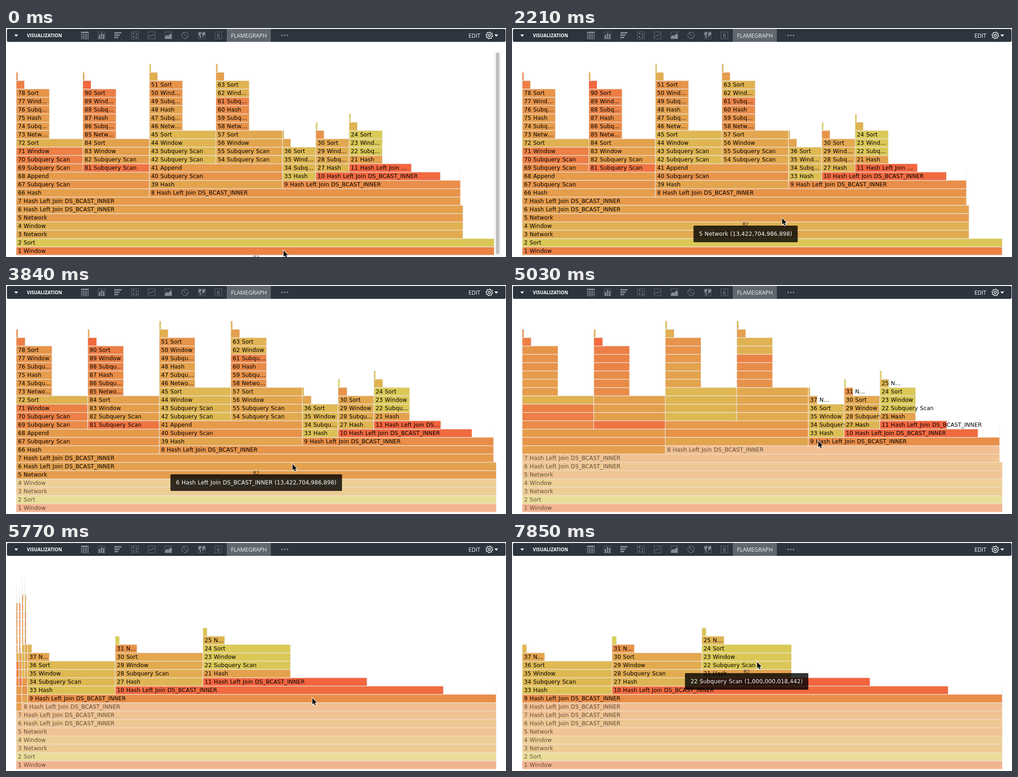
Recreate the animation shown at these times as an HTML page with a canvas. Size 1078x496 px, loop 8000 ms.

```html
<!DOCTYPE html>
<html lang="en">
<head>
<meta charset="utf-8">
<title>Flamegraph</title>
<style>
html, body { margin: 0; width: 100%; height: 100%; overflow: hidden; background: #fff; }
canvas { display: block; }
</style>
</head>
<body>
<canvas id="stage" width="1078" height="496"></canvas>
<script>
const ctx = document.getElementById('stage').getContext('2d');
const LOOP = 8000, LEFT = 22, WIDTH = 1035, ROW = 18, BASE = 474, MIN_LABEL = 35, ZOOM_TIME = 750;
const LABEL_FONT = '12px Verdana, "DejaVu Sans", sans-serif';
const TOTAL = 14.422704986898, MAIN = 13.422704986898;
const JOIN = 'Hash Left Join DS_BCAST_INNER', SCAN = 'Subquery Scan';

// Plan nodes: widths are in trillions of cost units.
const nodes = [];
function chain(id, x, depth, ...steps) {
  for (const [name, w] of steps) nodes.push({ id, x, depth: depth++, w, label: `${id++} ${name}` });
}
const leaf = 1.000000018442, pair = 2.000000036884, quad = 4.000000073768;
const tail = [['Network', 0.25], ['Seq Scan', 0.05]];
const small = [['Hash', leaf], [SCAN, leaf], ['Window', leaf], ['Sort', leaf], ...tail];
const tower = [[SCAN, pair], [SCAN, pair], ['Window', pair], ['Sort', pair], ['Network', leaf], [SCAN, leaf], ...small.slice(0, 1),
  ...small.slice(1)];
const trunk = [['Hash', quad], [SCAN, quad], ['Append', quad]];

chain(1, 0, 0, ['Window', TOTAL], ['Sort', TOTAL], ['Network', MAIN], ['Window', MAIN], ['Network', MAIN],
  [JOIN, MAIN], [JOIN, 13.347204986731]);
chain(8, 4, 7, [JOIN, 9.347204912963]);
chain(9, 8, 8, [JOIN, 5.347204839195]);
chain(10, 9, 9, [JOIN, 3.745204820753]);
chain(11, 10, 10, [JOIN, 1.874204802311]);
chain(12, 13.345, 9, ['Hash', 0.002]);
chain(21, 10, 11, ...small);
chain(27, 9, 10, ...small);
chain(33, 8, 9, ...small);
chain(39, 4, 8, trunk[0], trunk[1], trunk[2]);
chain(42, 4, 11, ...tower);
chain(54, 6, 11, ...tower);
chain(66, 0, 7, ...trunk);
chain(69, 0, 10, ...tower);
chain(81, 2, 10, ...tower);
nodes.sort((a, b) => a.depth - b.depth || a.x - b.x);

// Warm colour from the first seven characters of the label.
function warmColor(label) {
  let hash = 0, max = 0, weight = 1;
  for (const ch of label.slice(0, 7)) {
    hash += weight * (ch.charCodeAt(0) % 10);
    max += weight * 9;
    weight *= 0.7;
  }
  const v = hash / max;
  return `rgba(${200 + Math.round(55 * v)},${Math.round(230 * (1 - v))},${Math.round(55 * (1 - v))},0.8)`;
}
nodes.forEach(n => { n.color = warmColor(n.label); });
const byId = id => nodes.find(n => n.id === id);

const zooms = [
  { click: 0, start: -ZOOM_TIME, node: byId(1) },
  { click: 2500, start: 2495, node: byId(5) },
  { click: 5020, start: 5182, node: byId(9) }
];
const tips = [[0, 1], [364, 2], [868, 3], [1372, 4], [1876, 5], [2500, 0], [3830, 6], [3915, 7], [4225, 8],
  [4535, 9], [5020, 0], [6365, 10], [6665, 11], [7043, 21], [7420, 22]];
const path = [[140, 598, 482], [2150, 582, 412], [3760, 582, 412], [3835, 617, 388], [4730, 660, 338],
  [6280, 660, 338], [6370, 652, 326], [7400, 543, 277], [7840, 528, 260]];

const clamp = v => Math.max(0, Math.min(1, v));
const lerp = (a, b, p) => a + (b - a) * p;
const easeCubic = t => t < 0.5 ? 4 * t ** 3 : 1 - 4 * (1 - t) ** 3;
const project = (u, focus) => LEFT + WIDTH * clamp((u - focus.x) / focus.w);

function text(str, x, y, font, color, align = 'left') {
  ctx.font = font;
  ctx.fillStyle = color;
  ctx.textAlign = align;
  ctx.fillText(str, x, y);
}
function plot(points, close) {
  ctx.beginPath();
  points.forEach(([x, y]) => ctx.lineTo(x, y));
  if (close) ctx.closePath();
}
function roundBox(x, y, w, h, r, color) {
  ctx.beginPath();
  ctx.roundRect(x, y, w, h, r);
  ctx.fillStyle = color;
  ctx.fill();
}
function disc(x, y, r, fill) {
  ctx.beginPath();
  ctx.arc(x, y, r, 0, 7);
  fill ? ctx.fill() : ctx.stroke();
}
function setSpacing(letter, word) {
  ctx.letterSpacing = letter + 'px';
  ctx.wordSpacing = word + 'px';
}

function fitLabel(label, width) {
  const room = width - 7.4;
  if (ctx.measureText(label).width <= room) return label;
  let n = label.length;
  while (n > 0 && ctx.measureText(label.slice(0, n)).width + 10 > room) n--;
  return label.slice(0, n) + '…';
}

function drawGraph(t) {
  const k = zooms.findLastIndex(z => t >= z.click);
  const focus = zooms[k].node, from = zooms[Math.max(0, k - 1)].node;
  const p = easeCubic(clamp((t - zooms[k].start) / ZOOM_TIME));
  ctx.lineWidth = 1;
  ctx.strokeStyle = '#eee';
  for (const n of nodes) {
    const end0 = project(n.x, focus), end1 = project(n.x + n.w, focus);
    const x0 = lerp(project(n.x, from), end0, p), x1 = lerp(project(n.x + n.w, from), end1, p);
    if (x1 - x0 < 0.01) continue;
    const y = BASE - ROW * n.depth;
    const isAncestor = n.depth < focus.depth && n.x <= focus.x && n.x + n.w > focus.x;
    ctx.globalAlpha = isAncestor ? 0.6 : 1;
    ctx.fillStyle = n.color;
    ctx.fillRect(x0, y, x1 - x0, ROW);
    ctx.strokeRect(x0, y, x1 - x0, ROW);
    // Labels take their final width as soon as a zoom begins.
    if (end1 - end0 >= MIN_LABEL) {
      ctx.font = LABEL_FONT;
      text(fitLabel(n.label, end1 - end0), x0 + 4, y + 13, LABEL_FONT, '#000');
    }
  }
  ctx.globalAlpha = 1;
  return focus;
}

function drawTip(t, focus) {
  const id = tips.findLast(s => t >= s[0])[1];
  if (!id) return;
  const n = byId(id);
  const mid = (project(n.x, focus) + project(n.x + n.w, focus)) / 2;
  const top = BASE - ROW * n.depth + ROW + 8;
  const str = `${n.label} (${Math.round(n.w * 1e12).toLocaleString('en-US')})`;
  ctx.font = LABEL_FONT;
  const w = ctx.measureText(str).width + 24;
  text('B2', mid, top + 1, '10px Verdana, "DejaVu Sans", sans-serif', 'rgba(0,0,0,0.8)', 'center');
  roundBox(mid - w / 2, top, w, 36, 2, 'rgba(0,0,0,0.8)');
  text(str, mid - w / 2 + 12, top + 22, LABEL_FONT, '#fff');
}

function drawScrollbar(t) {
  ctx.globalAlpha = 1 - clamp((t - 300) / 300);
  ctx.fillStyle = '#e8e8e8';
  ctx.fillRect(1052, 50, 15, 446);
  ctx.fillStyle = '#fafafa';
  ctx.fillRect(1053, 50, 13, 446);
  roundBox(1056, 53, 8, 437, 4, '#c1c1c1');
  ctx.globalAlpha = 1;
}

function drawCursor(t) {
  let i = path.findIndex(k => t < k[0]);
  if (i < 0) i = path.length;
  const a = path[Math.max(0, i - 1)], b = path[Math.min(i, path.length - 1)];
  const p = a === b ? 0 : (t - a[0]) / (b[0] - a[0]);
  ctx.save();
  ctx.translate(lerp(a[1], b[1], p) + 0.5, lerp(a[2], b[2], p));
  plot([[0, 0], [0, 13.5], [3, 10.8], [5, 15.6], [7.3, 14.6], [5.3, 10], [9.5, 10]], true);
  ctx.strokeStyle = '#fff';
  ctx.lineWidth = 2;
  ctx.stroke();
  ctx.fillStyle = '#000';
  ctx.fill();
  ctx.restore();
}

// Each icon is drawn in a 16 by 16 box.
const frame = () => ctx.strokeRect(0.5, 0.5, 15, 15);
const bar = (...r) => ctx.fillRect(...r);
const icons = [
  () => {
    frame();
    bar(0, 0, 16, 3);
    for (const y of [6, 9, 12]) bar(0, y, 16, 1);
    for (const x of [5, 10]) bar(x, 0, 1, 16);
  },
  () => { ctx.globalAlpha = 0.5; frame(); ctx.globalAlpha = 1; bar(2, 7, 3, 9); bar(6.5, 3, 3, 13); bar(11, 5, 3, 11); },
  () => { bar(0, 0, 1, 16); bar(1, 1, 14, 3); bar(1, 6, 10, 3); bar(1, 11, 7, 3); },
  () => { ctx.globalAlpha = 0.6; frame(); ctx.globalAlpha = 1; for (const [x, y] of [[5, 4], [11, 6], [5, 11], [11, 12]]) disc(x, y, 1.5, true); },
  () => { ctx.globalAlpha = 0.6; frame(); ctx.globalAlpha = 1; plot([[1, 12], [5, 8], [8, 9], [14, 4]]); ctx.stroke(); },
  () => { ctx.globalAlpha = 0.6; frame(); ctx.globalAlpha = 1; plot([[1, 15], [1, 11], [5, 7], [8, 9], [12, 4], [15, 6], [15, 15]]); ctx.fill(); },
  () => { disc(8, 8, 7); plot([[4, 2.5], [8, 8], [13, 12.5]]); ctx.stroke(); },
  () => {
    ctx.globalAlpha = 0.5; frame(); ctx.globalAlpha = 1;
    plot([[1, 2], [7, 1], [7, 5], [4, 8], [7, 10], [5, 15], [3, 9], [1, 6]]); ctx.fill();
    plot([[9, 2], [15, 1], [15, 8], [12, 7], [11, 13], [9, 8]]); ctx.fill();
  },
  () => { ctx.globalAlpha = 0.6; frame(); ctx.globalAlpha = 1; text('6', 8, 12.5, '12px "Open Sans", sans-serif', '#8b9198', 'center'); }
];

function caret(x, y, w, h) {
  plot([[x, y], [x + w, y], [x + w / 2, y + h]], true);
  ctx.fillStyle = '#fff';
  ctx.fill();
}

function drawHeader() {
  roundBox(2, 2, 1075, 28, 3, '#2c343e');
  caret(18, 14, 8, 5);
  text('VISUALIZATION', 45, 20, 'bold 10px "Open Sans", sans-serif', '#fff');
  icons.forEach((icon, i) => {
    ctx.save();
    ctx.translate(162 + 36 * i, 8);
    ctx.fillStyle = ctx.strokeStyle = '#858c94';
    ctx.lineWidth = 1;
    icon();
    ctx.restore();
  });
  ctx.fillStyle = '#5f666e';
  ctx.fillRect(476, 2, 95, 28);
  text('FLAMEGRAPH', 485, 21, '12px "Open Sans", sans-serif', '#f4f4f5');
  ctx.fillStyle = '#858c94';
  for (const x of [595, 601, 607]) disc(x, 16, 1.8, true);
  text('EDIT', 997, 21, '12px "Open Sans", sans-serif', '#fff');
  ctx.strokeStyle = '#fff';
  ctx.lineWidth = 1.3;
  const teeth = Array.from({ length: 32 }, (_, i) => {
    const a = (i + 0.5) * Math.PI / 16, r = i % 4 < 2 ? 7.4 : 5.6;
    return [1042 + r * Math.cos(a), 16 + r * Math.sin(a)];
  });
  plot(teeth, true);
  ctx.stroke();
  disc(1042, 16, 2.4);
  caret(1053, 14, 8, 5);
}

function draw() {
  const t = performance.now() % LOOP;
  ctx.fillStyle = '#fff';
  ctx.fillRect(0, 0, 1078, 496);
  setSpacing(0, 0);
  drawHeader();
  setSpacing(0.1, 0.4);
  const focus = drawGraph(t);
  drawTip(t, focus);
  drawScrollbar(t);
  drawCursor(t);
  requestAnimationFrame(draw);
}
draw();
</script>
</body>
</html>
```
